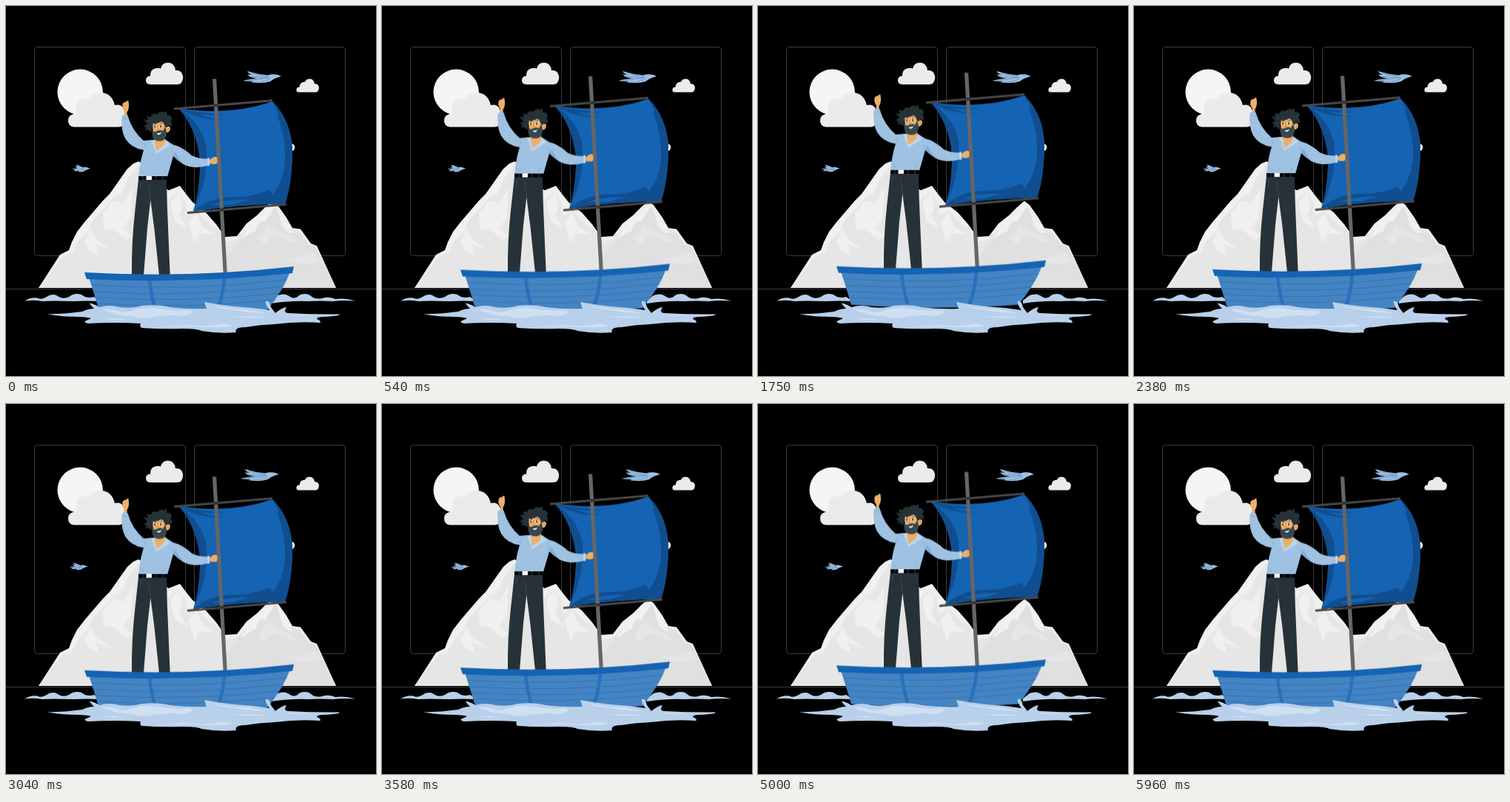
These frames come from a looping animation (500 px wide and 500 px high, 6000 ms). An HTML page:

```html
<!DOCTYPE html>
<html lang="en">
<head>
<meta charset="utf-8">
<title>Sailing</title>
<style>
  html, body { margin: 0; width: 100%; height: 100%; overflow: hidden; background: #000; }
  svg { display: block; width: 100%; height: 100%; }
  .boat { animation: bob 3s linear infinite; }
  .birds { animation: drift 6s linear infinite; }
  @keyframes bob {
    50% { transform: translateY(-10px); }
  }
  @keyframes drift {
    10%, 90% { transform: translateX(-1px); }
    20%, 80% { transform: translateX(2px); }
    30%, 50%, 70% { transform: translateX(-4px); }
    40%, 60% { transform: translateX(4px); }
  }
  .line { fill: none; stroke: #3c3c3c; }
  .cloud { fill: #ebebeb; }
  .snow { fill: #f0f0f0; }
  .rock { fill: #e6e6e6; }
  .rock2 { fill: #e0e0e0; }
  .water { fill: #b8d0ea; }
  .foam { fill: #cfe0f2; }
  .bird { fill: #9dc0e4; }
  .feather { fill: none; stroke: #6797c8; stroke-width: .9; }
  .sail { fill: #1563b3; }
  .fold { fill: #104e90; }
  .hull { fill: #4484c3; }
  .plank { fill: none; stroke: #3270b0; stroke-width: .8; }
  .rib { fill: none; stroke: #2870bb; stroke-width: 4.5; }
  .yard { stroke: #484848; stroke-width: 3; }
  .shirt { fill: #9fc1e2; }
  .collar { fill: #bcd6ef; }
  .crease { fill: none; stroke: #83add7; stroke-width: .8; }
  .skin { fill: #edaf67; }
  .dark { fill: #263238; }
  .beard { fill: #37474f; }
</style>
</head>
<body>
<svg viewBox="0 0 500 500">
  <!-- Sky -->
  <rect class="line" x="38.500" y="55.500" width="204" height="282" rx="4"/>
  <rect class="line" x="254.500" y="55.500" width="204" height="282" rx="4"/>
  <circle cx="100.200" cy="116.300" r="30.700" fill="#f5f5f5"/>
  <path class="cloud" d="M92 163.500 Q84 163 84 154.500 Q84 146 95 145.500 Q93 136 97 130 Q103 123 112 125 Q117 117 129 117 Q143 118 147 134 Q155 132 159 139 Q162 145 159.500 151 Q161 163.500 152 163.500Z"/>
  <path class="cloud" d="M195 106 Q189 105.500 189 100.500 Q189 95 195 94.500 Q195 86 201 84.500 Q206 83 209 84.500 Q211 76.500 219 76.500 Q228 77 229 87 Q238 86 239.300 96 Q239 106 231 106Z"/>
  <path class="cloud" d="M395 116.500 Q392 116 392.500 112.500 Q393 109.500 396.500 109.500 Q397 102.500 404 102.500 Q406 98 411 98.500 Q416 99 417 105 Q423 105 423 111 Q422 116.500 418 116.500Z"/>
  <circle cx="385" cy="191" r="5.300" fill="#f5f5f5"/>
  <g class="birds">
    <path class="bird" d="M372 95 L367.500 93 Q360 91.500 354 93.500 Q340 92.500 326 88 Q328 91.500 333 93 L326 92.500 Q330 97 340 98 Q331 98 320 101 Q328 102 334 101.500 L331 103 Q346 105.500 357 102 Q362 97.500 372 95Z"/>
    <path class="feather" d="M331 90.500 Q342 95 355 95 M331 95 Q342 97 354 96.500 M326 100.500 Q341 99 357 97 M335 103 Q348 102.500 356 99"/>
    <path class="bird" d="M114 219.500 L110.500 218.500 Q107 217 104 218 Q99 215 94 214.500 Q95 216.500 97 217.500 L93 217.500 Q95 219 97 219.500 L89 220 Q92 221.500 95 221 L91 223 Q95 223.500 98 222.500 L98.500 224 Q104 225 107.500 222 Q110 220.500 114 219.500Z"/>
    <path class="feather" d="M98 217 L106 219 M95 220.500 L106 220 M98 223 L106 221"/>
  </g>

  <!-- Mountains -->
  <path class="snow" d="M44 381 L73 336 L85 330 L89 319 L96 305 L107 291 L131 263 L140 254 L164 220 L172 213 L179 210 L187 214 L212 245 L220 249 L235 243 L244 255 L252 265 L270 279 L284 295 L296 312 L312 311 L325 294 L339 283 L350 272 L360 263.500 L367 269 L379 286 L387 300 L398 301.500 L412 321 L420 324 L446 381Z"/>
  <path class="rock" d="M44 381 L76 339 L90 333 L99 316 L113 301 L118 288 L130 276 L145 260 L157 252 L166 232 L179 214 L186 235 L200 252 L218 263 L233 250 L242 264 L245 283 L258 276 L274 294 L285 300 L298 318 L313 315 L325 302 L330 381Z"/>
  <path class="snow" d="M131 279 L145 263 L158 267 L171 246 L169 285 L158 300 L171 311 L163 316 L143 300 L132 302Z M106 320 L114 301 L123 316 L142 330 L121 322 L126 338 L111 328Z M222 265 L234 251 L239 270 L234 284 L245 300 L228 291Z M247 292 L257 280 L266 299 L281 307 L260 308 L255 322Z"/>
  <path class="rock2" d="M300 381 L298 340 L312 319 L327 302 L342 294 L359 268 L371 278 L382 300 L398 306 L409 322 L419 326 L446 381Z"/>
  <path class="snow" d="M325 303 L343 287 L359 267 L364 270 L350 292 L343 290 L338 303 L317 316Z M366 271 L379 292 L386 304 L393 306 L382 307 L374 299 L371 290Z"/>
  <path class="rock" d="M341 314 L354 295 L363 302 L381 309 L394 320 L379 317 L361 309 L349 322Z M368 337 L388 342 L417 334 L425 345 L411 348 L394 348Z"/>
  <path class="line" d="M0 382.500H500"/>
  <path fill="none" stroke="#09140f" d="M52 390.500H120 M375 389.500H416"/>

  <!-- Far waves -->
  <path class="water" d="M25 398.500 Q34 393 42 394.500 Q48 397.500 55 393 Q62 388 69 391.500 Q76 397 85 393 Q93 387 102 390 Q109 396 119 393 L128 399 Q108 398 91 399 Q60 398 49 399 Q38 397 25 398.500Z"/>
  <path class="water" d="M358 398 L367 391 Q377 387 384 393 Q391 397 396 391 Q404 387 411 391 Q417 397 427 395 Q436 392 445 396 Q458 394 472 398.500 Q455 397.500 442 399 Q423 398 409 399 Q385 398 358 402Z"/>

  <g class="boat">
    <!-- Rigging -->
    <path class="sail" d="M233 138 Q302 149 360 129 Q384 153 387 192 Q387 239 377 267.500 Q314 268 253 277.500 Q263 247 262 207 Q257 164 233 138Z"/>
    <path class="fold" d="M233 138 Q266 160 271 193 Q273 238 253 277.500 Q263 247 262 207 Q257 164 233 138Z M360 129 Q384 153 387 192 Q387 239 377 267.500 L358 257 Q374 240 377 211 Q379 180 366 146 Q371 148 360 129Z M253 277.500 Q273 259 305 258 Q335 258 357 248 Q358 257 377 267.500 Q314 268 253 277.500Z M235 139 Q263 145 300 147 Q276 149 262 146 Q277 154 302 153 Q264 157 235 139Z"/>
    <path class="sail" d="M277 269 Q300 260 330 262 Q318 264 308 268Z"/>
    <path class="yard" d="M227 139 L360 127.700 M245 279.500 L379 268"/>
    <path fill="#666" d="M279 98.500 H284.200 L299 364 H293.800Z"/>
    <path stroke="#353535" stroke-width="4" d="M281 134.500 L287 134 M289 275.500 L295 275"/>

    <!-- Sailor -->
    <path class="dark" d="M179 234 H217 L217.800 270 L221.700 364 H207 L200.500 302 L195.300 262 L191 300 L186 364 H170 Q169.500 320 174 280Z"/>
    <path fill="none" stroke="#455a64" stroke-width=".6" d="M195.300 262 L193 242 M183 238 L181 247"/>
    <path class="skin" d="M157.500 133 Q158 130 161 130 L165 127.500 Q166.500 131 165.800 138 Q165 142 163.500 143.500 L164 151 H159 L160 142.500 Q156.500 139 157.500 133Z"/>
    <path class="shirt" d="M156.500 149 Q160 145 164.500 148 Q170 168 186 182 L198 181 L216 181 L226 187.500 Q238 190 251 202 Q261 207 274 206.500 L274 215.500 Q254 221 240 214 Q232 209 226 203 L218 231 H179 Q181 210 186 194.500 Q169 192 161 179 Q155 168 156.500 149Z"/>
    <path class="crease" d="M186 194 L189 186 M226 203 L224 194 M157 153 Q161 151 165 152 M182 222 L186 227 M216 222 L211 227"/>
    <path fill="#83add7" d="M226 203 L229 196 Q232 204 240 214Z"/>
    <path class="collar" d="M272 205.500 L275 205.500 L275.500 215.500 L272.500 216Z"/>
    <path class="skin" d="M275 208 L280 204.500 Q283 203 285.500 205 V212.500 Q281 215 275 212.500Z"/>
    <path class="skin" d="M200 177 L214 174 L216 184 Q212 195 203 198 Q202 190 200 183Z"/>
    <path class="collar" d="M196 181 L201 182 L203 196 L213 189 L216 181 L222 188 L203 200Z"/>
    <path fill="#000" d="M179 230 H218 V235 H179Z"/>
    <path fill="#fff" d="M189.500 230 H197 V235 H189.500Z"/>
    <path stroke="#37474f" d="M185 230 V235 M203 230 V235 M212 230 V235"/>
    <path class="skin" d="M198 157 Q207 151 216 156 L217 163 Q222 161 222 166 Q221 171 217 171 L214 180 Q205 184 199 178Z"/>
    <path class="dark" d="M198 164 L196 171 L192 167 L188 169 L190 164 L186 163 L191 159 L186 153 L192 154 L190 149 L196 150 Q197 144 205 146 Q208 141 213 144 L217 142 L217 147 Q224 147 224 153 L222 155 Q226 158 223 163 L220 161 L217 164 L215 164 Q214 158 210 156 Q203 160 198.500 158.500Z"/>
    <path class="beard" d="M197.500 167 Q199 171 203 169.500 Q208 166.500 212 169 L215.500 163 L217 171 Q217 180 211 182 Q203 184 199 179 Q197 175 197.500 167Z"/>
    <path fill="#fff" d="M203.500 172 Q207 172.500 210 170.500 Q209 174 205.500 174Z M199.500 162 H202.500 V164.500 H199.500Z M207.500 161.500 H210.500 V164 H207.500Z"/>
    <path class="dark" d="M200.300 161.800 H202 V164.500 H200.300Z M208.300 161.300 H210 V164 H208.300Z M199 160 L203 159 V160Z M207 158.500 L211 158.500 V159.500Z"/>
    <path fill="none" stroke="#cf8a48" stroke-width=".8" d="M205 161 L204 167 L206.500 167 M218.500 164 Q220.500 165 219 168"/>

    <!-- Hull -->
    <path class="hull" d="M112 367 Q250 377 384 359 Q375 384 352 412 Q240 420 126 412 Q121 395 112 367Z"/>
    <path class="plank" d="M116 377 Q250 386 379 370 M119 386 Q250 394 375 379 M122 394 Q250 402 369 388 M124 402 Q250 410 363 397"/>
    <path class="rib" d="M194 370 Q196 390 202 411 M295 367 Q294 388 286 411"/>
    <path class="sail" d="M106 360 Q250 368 389 352 L387 361 Q250 376 109 369Z"/>
  </g>

  <!-- Near water -->
  <path class="water" d="M56 416.500 Q81 416 103 413 Q111 409 119 409 Q114 404 113 401.500 Q121 403 126 407 Q140 403 153 407 Q171 409 183 405 Q207 403 221 407 Q246 410 271 409 L268 400 Q300 406 334 408 L356 411 Q350 403 351 399 Q356 397 358 407 L364 415 Q374 407 379 407 Q374 415 382 415 Q415 417 451 416.500 Q451 419 429 420 Q420 420 420 423 Q427 426 424 428 Q394 426 363 430 Q340 431 324 434 Q308 434 311 441 Q288 443 264 439 Q259 436 239 436 Q210 437 184 435 Q180 434 182 429 Q146 427 111 429 Q102 427 111 424 Q122 421 99 420 Q77 420 56 416.500Z"/>
  <path class="foam" d="M130 410 Q142 409 150 412 Q160 416 172 411 Q187 406 206 409 Q226 413 249 411 Q257 416 238 419 Q218 416 195 421 Q178 423 172 419 Q154 419 143 415 Q136 413 130 410Z M274 404 Q294 408 324 410 Q340 412 350 415 Q332 415 309 411 Q288 409 274 404Z M207 433 Q233 430 260 432 Q279 433 291 429 Q304 430 306 433 Q280 435 251 433Z M305 420 Q331 418 353 421 Q333 422 305 420Z M130 423 Q148 421 165 424 Q148 425 130 423Z M376 418 Q401 417 421 418 Q399 420 376 418Z"/>
</svg>
</body>
</html>
```
